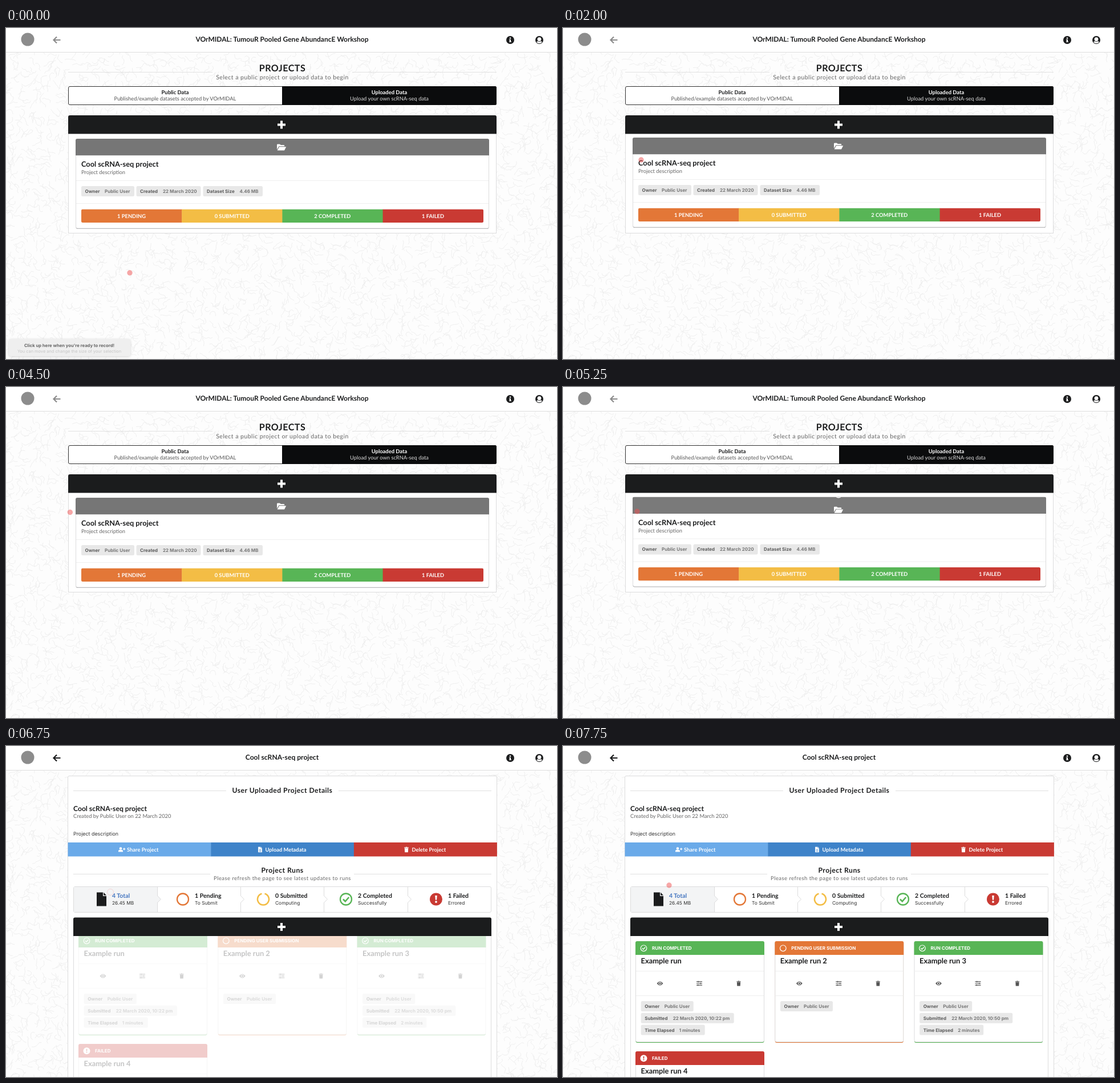
Recreate the animation shown at these times as an HTML page. Size 966 px wide and 580 px high, loop 8000 ms.

```html
<!DOCTYPE html>
<html lang="en">
<head>
<meta charset="utf-8">
<title>Project browser</title>
<style>
  html, body { margin: 0; width: 100%; height: 100%; overflow: hidden; background: #fdfdfd; }
  svg { display: block; }
  text { font-family: Lato, sans-serif; text-rendering: geometricPrecision; }
  text.ui { font-family: Inter, sans-serif; }
</style>
</head>
<body>
<svg id="stage" width="966" height="580" viewBox="0 0 966 580"></svg>
<script>
const BLACK = '#1b1c1d', ORANGE = '#e37737', YELLOW = '#f3bd45', GREEN = '#58b556', RED = '#c93a33';
const LINE = '#dcdcdd', STEP = 250, LOOP = 8000;

// Markup helpers
const text = (x, y, str, size, fill = BLACK, o = {}) =>
  `<text x="${x}" y="${y}" font-size="${size}" fill="${fill}" font-weight="${o.bold ? 700 : 400}"
    text-anchor="${o.mid ? 'middle' : 'start'}" letter-spacing="${o.gap || 0}" class="${o.ui ? 'ui' : ''}">${str}</text>`;
const rect = (x, y, w, h, fill, more = '') => `<rect x="${x}" y="${y}" width="${w}" height="${h}" fill="${fill}" ${more}/>`;
const path = (d, fill, more = '') => `<path d="${d}" fill="${fill}" ${more}/>`;
const line = (d, stroke = LINE, width = 1, more = '') => path(d, 'none', `stroke="${stroke}" stroke-width="${width}" ${more}`);
const circle = (r, fill, more = '') => `<circle r="${r}" fill="${fill}" ${more}/>`;
const at = (x, y, inner, scale = 1) => `<g transform="translate(${x} ${y}) scale(${scale})">${inner}</g>`;
const topRounded = (x, y, w, h, fill) =>
  path(`M${x} ${y + h}v${3 - h}q0-3 3-3h${w - 6}q3 0 3 3v${h - 3}z`, fill);

// Icons, centred on 0,0
const plus = path('M-2-7H2V-2H7V2H2V7H-2V2H-7V-2H-2Z', '#fff');
const eye = (fill, hole) => path('M-8 0Q0-10.5 8 0Q0 10.5-8 0Z', fill) + circle(3.7, hole) + circle(2.3, fill);
const folder = path('M-8 4V-4.3Q-8-5.5-6.8-5.5H-3L-1.3-4H4Q5.2-4 5.2-2.8V-1.7H-4.6ZM-7.4 5.4L-4-.8H8.2L5 5.4Z', '#fff');
const trash = fill => path('M-4-4.2H-1.5L-1-5H1L1.5-4.2H4V-3H-4ZM-3.4-2.4H3.4L3 5H-3Z', fill);
const sliders = line('M-5.5-3.3H5.5M-5.5 0H5.5M-5.5 3.3H5.5M-2-4.6v2.6M2.5-1.3v2.6M-2.5 2v2.6', '#555', 1.3);
const arrow = fill => line('M6.5 0H-5M0-5.5L-5.5 0L0 5.5', fill, 2.2);
const ring = (color, r, width) => circle(r, 'none', `stroke="${color}" stroke-width="${width}"`);
const check = (color, r, width) => ring(color, r, width) +
  line(`M${-r * .5} 0L${-r * .12} ${r * .38}L${r * .52} ${-r * .35}`, color, width * 1.15);
const alert = (fill, mark, r) => circle(r, fill) +
  path(`M${-r * .16} ${-r * .6}H${r * .16}L${r * .1} ${r * .12}H${-r * .1}Z`, mark) + `<circle cy="${r * .42}" r="${r * .17}" fill="${mark}"/>`;
const info = circle(7, BLACK) + path('M-1.8-1H1V2.4H2V3.8H-2V2.4H-1V.4H-1.8Z', '#fff') + '<circle cy="-3.2" r="1.3" fill="#fff"/>';
const person = circle(7, BLACK) + '<circle cy="-1.3" r="3.4" fill="#fff"/>' +
  path('M-5 3.5Q-3.5 2.2-2 2.4Q0 3.2 2 2.4Q3.5 2.2 5 3.5Q3 6.1 0 6.1Q-3 6.1-5 3.5Z', '#fff');
const userPlus = path('M-6 4V2.6Q-6 .6-4 .6H0Q2 .6 2 2.6V4Z', '#fff') + '<circle cx="-2" cy="-2" r="2.3" fill="#fff"/>' +
  line('M2.2-1H6.2M4.2-3V1', '#fff', 1.3);
const file = (fill, fold) => path('M-8.5-12H2.5V-5.5H8.5V12H-8.5Z', fill) + path('M3.7-12L8.5-6.8H3.7Z', fill) +
  (fold ? line('M-4.5 0H4.5M-4.5 4H4.5M-4.5 8H4.5', fold, 1.7) : '');

// A grey label with a key and a paler value
const tag = (x, mid, w, key, value, valueX) => rect(x, mid - 9, w, 18, '#e8e8e8', 'rx="2.5"') +
  text(x + 6.5, mid + 2.9, key, 8, '#5c5c5c', { bold: 1, ui: 1 }) +
  text(x + valueX, mid + 2.9, value, 8, '#777', { bold: 1, ui: 1 });

// Seeded squiggles for the page background
function squiggles() {
  let seed = 7, d = '';
  const rnd = () => (seed = seed * 16807 % 2147483647) / 2147483647;
  for (let y = 46; y < 590; y += 13) for (let x = -6; x < 972; x += 13) {
    let angle = rnd() * 6.28;
    d += `M${(x + rnd() * 11).toFixed(1)} ${(y + rnd() * 11).toFixed(1)}`;
    for (let i = 0; i < 5; i++) {
      angle += (rnd() - .5) * 2.4;
      d += `l${(4 * Math.cos(angle)).toFixed(1)} ${(4 * Math.sin(angle)).toFixed(1)}`;
    }
  }
  return line(d, '#ebebeb', .8);
}

const navBar = rect(0, 0, 966, 42, '#fff') + line('M0 42.5H966', '#dedede') +
  at(38, 20, circle(11.5, '#8c8c8c')) + at(884, 21, info) + at(935, 21, person);

function statusBar() {
  const parts = [['1 PENDING', ORANGE], ['0 SUBMITTED', YELLOW], ['2 COMPLETED', GREEN], ['1 FAILED', RED]];
  return `<g clip-path="url(#pill)">` + parts.map(([name, color], i) => rect(132 + i * 176.2, 315.5, 176.7, 23.5, color) +
    text(220 + i * 176.2, 330.7, name, 9.33, '#fff', { bold: 1, mid: 1 })).join('') + '</g>';
}

const projectCard = `<g id="card">
  ${rect(122.5, 193.5, 724, 156.5, '#9b9c9d', 'rx="3"')}
  ${rect(122.5, 192.5, 724, 156.5, '#fff', `rx="3" stroke="${LINE}"`)}
  <g clip-path="url(#head)"><rect id="lid" x="122" y="192" width="725" height="29.5"/>
    <g id="folder">${folder}</g><g id="eye">${eye('#fff', '#838383')}</g></g>
  ${text(132, 241.3, 'Cool scRNA-seq project', 12.75, BLACK, { bold: 1 })}
  ${text(132, 254.2, 'Project description', 9.33, '#666')}
  ${line('M123 265.5H846M123 305.5H846', '#efefef')}
  ${tag(132, 284, 93, 'Owner', 'Public User', 41)}
  ${tag(228.5, 284, 113, 'Created', '22 March 2020', 46.5)}
  ${tag(345.5, 284, 104.5, 'Dataset Size', '4.46 MB', 64)}
  ${statusBar()}</g>`;

const listPage = at(89, 21, arrow('#8b8b8b')) +
  text(484, 23.6, 'VOrMIDAL: TumouR Pooled Gene AbundancE Workshop', 12, BLACK, { bold: 1, mid: 1 }) +
  line('M109 77.5H362M607 77.5H860', '#e2e2e2') +
  text(484.5, 75.8, 'PROJECTS', 16.1, BLACK, { bold: 1, mid: 1, gap: .47 }) +
  text(484.5, 90.4, 'Select a public project or upload data to begin', 10.5, '#666', { mid: 1, gap: .47 }) +
  rect(109.5, 102.5, 750, 32, '#fff', 'rx="2.5" stroke="#333"') +
  path('M484 102H857.500q2.500 0 2.500 2.500V132.500q0 2.500-2.500 2.500H484Z', '#0b0c0d') +
  text(296.5, 115.6, 'Public Data', 9.4, BLACK, { bold: 1, mid: 1 }) +
  text(296.5, 127.2, 'Published/example datasets accepted by VOrMIDAL', 9.33, '#555', { mid: 1 }) +
  text(672, 115.6, 'Uploaded Data', 9.4, '#fff', { bold: 1, mid: 1 }) +
  text(672, 127.2, 'Upload your own scRNA-seq data', 9.33, '#ddd', { mid: 1 }) +
  rect(109.5, 184.5, 750, 175, '#fff', `stroke="${LINE}"`) +
  topRounded(109, 153, 751, 32.5, BLACK) + at(483, 169.5, plus) + projectCard +
  `<g id="hint">${rect(5, 546, 213, 30, '#d2d2d2', 'rx="4" filter="url(#soft)"')}${rect(5, 545, 213, 30, '#efefef', 'rx="3"')}
    ${text(111, 558.6, 'Click up here when you\'re ready to record!', 7.65, '#666', { bold: 1, mid: 1, ui: 1 })}
    ${text(111, 568.6, 'You can move and change the size of your selection', 7.4, '#c6c6c6', { mid: 1, ui: 1 })}</g>`;

function runCard(x, y, color, icon, status, title, tags) {
  const icons = [eye('#555', '#fff'), sliders, trash('#555')];
  return rect(x + .5, y + 1.5, 225, 176.5, color, 'rx="3"') + rect(x + .5, y + .5, 225, 176, '#fff', `rx="3" stroke="${LINE}"`) +
    topRounded(x, y, 226, 24, color) + at(x + 14.5, y + 12.3, icon) +
    text(x + 29, y + 15, status, 8.05, '#fff', { bold: 1, ui: 1 }) +
    text(x + 9.5, y + 39.3, title, 12.9, BLACK, { bold: 1 }) +
    line(`M${x + 1} ${y + 52.5}h224m0 43h-224`, '#efefef') +
    icons.map((shape, i) => at(x + 43 + i * 69, y + 74, shape, i ? .92 : .68)).join('') +
    tags.map((t, i) => tag(x + 9.7, y + 114 + i * 20.8, ...t)).join('');
}

const owner = [92, 'Owner', 'Public User', 41];
const runTags = (time, minutes) => [owner, [163, 'Submitted', `22 March 2020, ${time} pm`, 56],
  [112, 'Time Elapsed', `${minutes} minutes`, 67]];
const runs = '<g id="runs">' +
  runCard(127, 342, GREEN, check('#fff', 5.3, 1.2), 'RUN COMPLETED', 'Example run', runTags('10:22', 1)) +
  runCard(371.3, 342, ORANGE, ring('#fff', 5.3, 1.2), 'PENDING USER SUBMISSION', 'Example run 2', [owner]) +
  runCard(615.5, 342, GREEN, check('#fff', 5.3, 1.2), 'RUN COMPLETED', 'Example run 3', runTags('10:50', 2)) +
  runCard(127, 535, RED, alert('#fff', RED, 6), 'FAILED', 'Example run 4', [owner]) + '</g>';

const actions = [['Share Project', '#6aaae9', 212, at(203, 181.5, userPlus)],
  ['Upload Metadata', '#3e83c9', 454.5, at(445.5, 181.5, file('#fff', '#3e83c9'), .4)],
  ['Delete Project', RED, 711.5, at(702, 181.5, trash('#fff'), .95)]]
  .map(([name, color, x, icon], i) => rect(108.5 + i * 250.7, 169, 251, 24.5, color) + icon +
    text(x, 184.9, name, 9.33, '#fff', { bold: 1 })).join('');

const steps = rect(118.5, 246.5, 732, 45, '#fff', `rx="2.5" stroke="${LINE}"`) + rect(119, 247, 146, 44, '#f3f4f5') +
  [265, 411, 557, 704].map((x, i) => line(`M${x + .5} 246V292`) +
    path(`M${x} 262l6.500 6.500l-6.500 6.500`, i ? '#fff' : '#f3f4f5', `stroke="${LINE}"`)).join('') +
  at(167.5, 268.5, file(BLACK)) + at(310, 268.5, ring(ORANGE, 10, 2.3)) +
  at(451, 268.5, line('M2.500-9.700A10 10 0 1 1-2.500-9.700', YELLOW, 2.6)) +
  at(596, 268.5, check(GREEN, 10, 2.3)) + at(754, 268.5, alert(RED, '#fff', 11)) +
  [[186, '4 Total', '26.45 MB'], [331, '1 Pending', 'To Submit'], [472, '0 Submitted', 'Computing'],
    [617, '2 Completed', 'Successfully'], [775, '1 Failed', 'Errored']]
    .map(([x, title, note], i) => text(x, 266.2, title, 10.5, i ? BLACK : '#4576c0', { bold: 1 }) +
      text(x, 277.8, note, 8.4, '#333', { ui: 1 })).join('');

const detailPage = at(89, 21, arrow(BLACK)) +
  text(484, 23.6, 'Cool scRNA-seq project', 12.1, BLACK, { bold: 1, mid: 1 }) +
  rect(108.5, 52.5, 752, 540, '#fff', `rx="2.5" stroke="${LINE}"`) +
  line('M118 78.5H386M583 78.5H851M118 224.5H358M610 224.5H851', '#e0e0e0') +
  text(484.5, 82.2, 'User Uploaded Project Details', 12.15, BLACK, { bold: 1, mid: 1, gap: .47 }) +
  text(118, 114.2, 'Cool scRNA-seq project', 12.15, BLACK, { bold: 1 }) +
  text(118, 126.2, 'Created by Public User on 22 March 2020', 9.33, '#666') +
  text(118, 156.8, 'Project description', 8.9, '#333', { ui: 1 }) + actions +
  text(484.5, 222.2, 'Project Runs', 12.2, BLACK, { bold: 1, mid: 1, gap: .47 }) +
  text(484.5, 234.7, 'Please refresh the page to see latest updates to runs', 9.45, '#666', { mid: 1, gap: .47 }) + steps +
  line('M118.5 333V580M850.5 333V580') + runs +
  topRounded(118, 300.5, 733, 32.5, BLACK) + at(483, 317, plus);

const stage = document.getElementById('stage');
stage.innerHTML = `<defs>
    <clipPath id="head">${path('M122 221.500V195q0-3 3-3H844q3 0 3 3V221.500Z', '#000')}</clipPath>
    <clipPath id="pill">${rect(132, 315.5, 705, 23.5, '#000', 'rx="2.5"')}</clipPath>
    <filter id="soft" x="-10%" y="-50%" width="120%" height="200%"><feGaussianBlur stdDeviation="2"/></filter></defs>
  ${rect(0, 0, 966, 580, '#fdfdfd')}${squiggles()}${navBar}
  <g id="list">${listPage}</g><g id="detail">${detailPage}</g>
  <g id="pointer"><circle id="dot" r="4.7" fill="#f05050" fill-opacity=".5"/>
  <circle id="click" r="5.5" fill="none" stroke="#f05050" stroke-opacity=".18"/></g>`;

// Motion: [time, value, ...] points joined by straight moves
const pointerX = [[0, 217], [250, 493], [500, 280], [750, 95], [1000, 96], [1250, 105], [1500, 126], [2000, 137], [2250, 141],
  [2500, 142], [3500, 142], [3750, 140], [4000, 128], [4250, 112], [5000, 113], [5250, 130], [5500, 141], [6000, 176],
  [6250, 183], [7250, 183], [7750, 186]];
const pointerY = [[0, 429], [250, 400], [500, 410], [750, 230], [1000, 94], [1250, 365], [1500, 325], [2000, 231], [2250, 214],
  [2500, 208], [3500, 208], [3750, 211], [4250, 220], [5250, 218], [5500, 212], [5750, 215], [6000, 246], [6250, 256],
  [7250, 256], [7750, 244]];
const lift = [[1250, 0], [1500, 1], [4000, 1], [4250, 0], [5000, 0], [5250, .75], [5500, 1]];
const peek = [[2000, 0], [2250, 1], [4000, 1], [4250, 0], [5000, 0], [5250, .28], [5500, 1], [5750, 1], [6000, 0]];
const hintFade = [[0, 1], [250, .6], [500, .2], [750, 0]];
const runsFade = [[6750, .25], [7000, .9], [7250, 1]];

function track(points, t) {
  const next = points.findIndex(p => p[0] > t);
  if (next === 0) return points[0][1];
  if (next < 0) return points[points.length - 1][1];
  const [t0, a] = points[next - 1], [t1, b] = points[next];
  return a + (b - a) * (t - t0) / (t1 - t0);
}

const el = id => document.getElementById(id);
const move = (id, x, y) => el(id).setAttribute('transform', `translate(${x} ${y})`);
const show = (id, on) => el(id).setAttribute('display', on ? 'inline' : 'none');
const fade = (id, value) => el(id).setAttribute('opacity', value);

function draw(t) {
  const open = t >= 6750, clicking = t >= 6500 && t < 7000;
  const p = track(peek, t), grey = Math.round(118 + 13 * p), shown = track(runsFade, t);
  show('list', !open);
  show('detail', open);
  move('card', 0, 2 - 2 * track(lift, t));
  el('lid').setAttribute('fill', `rgb(${grey},${grey},${grey})`);
  move('folder', 483, 207 + 28 * p);
  move('eye', 483, 181 + 28 * p);
  fade('hint', track(hintFade, t));
  fade('runs', shown);
  move('runs', 0, -13 * (1 - shown) / .75);
  move('pointer', track(pointerX, t), track(pointerY, t));
  show('dot', !clicking);
  show('click', clicking);
}

let last = -1;
function tick() {
  const t = Math.floor(performance.now() % LOOP / STEP) * STEP;
  if (t !== last) draw(last = t);
  requestAnimationFrame(tick);
}
tick();
</script>
</body>
</html>
```
